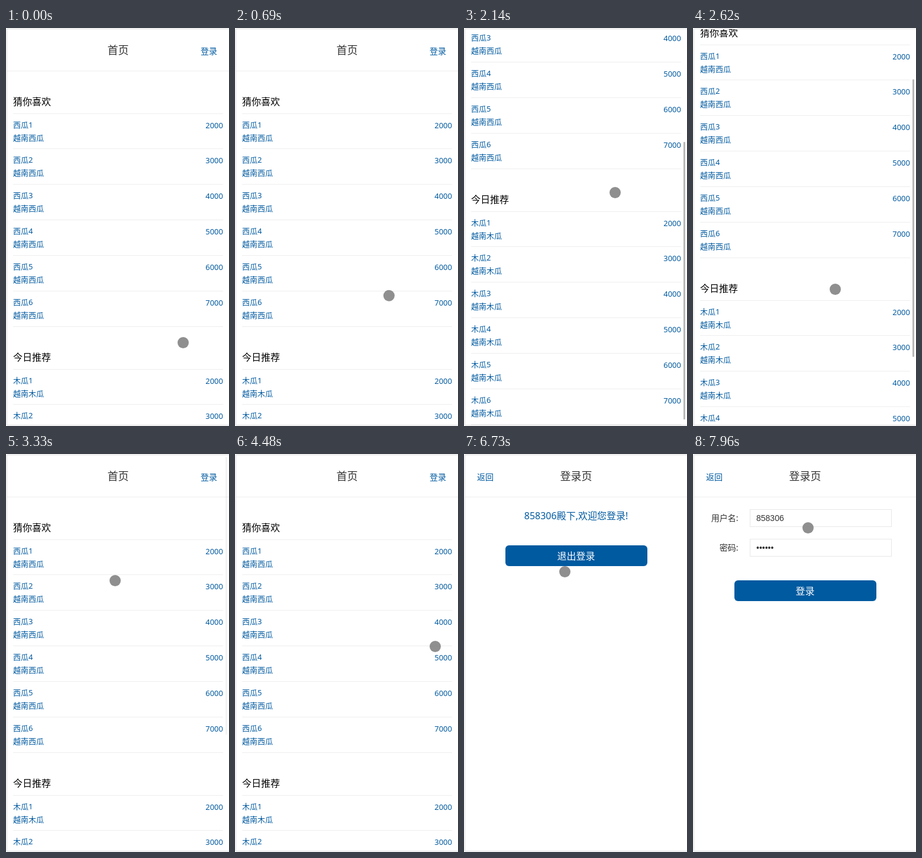
Recreate the animation shown at these times as an HTML page. Size 377 px wide and 671 px high, loop 8 s.

```html
<!DOCTYPE html>
<html lang="zh-CN">
<head>
<meta charset="utf-8">
<title>首页</title>
<style>
html, body { margin: 0; height: 100%; overflow: hidden; background: #fff; }
svg { display: block; width: 377px; height: 671px; }
text { font-family: "Noto Sans", "Noto Sans CJK SC", "Noto Sans CJK", sans-serif; white-space: pre; }
.arial { font-family: "Liberation Sans", Arial, sans-serif; }
</style>
</head>
<body>
<svg viewBox="0 0 377 671">
  <clipPath id="view"><rect x="2" y="2" width="375" height="667"/></clipPath>
  <path d="M378 1.5H1.5V669.5H378" fill="none" stroke="#ddd"/>
  <g clip-path="url(#view)">
    <g id="home"></g>
    <rect id="bar" x="371" width="3" height="468" rx="1" fill="#b8b8b8"/>
    <g id="login">
      <g id="welcome"></g>
      <g id="form"></g>
    </g>
    <g id="status"><path d="M1.5 669.5V647.5H121.5Q125.5 647.5 125.5 651.5V669.5Z" fill="#fff" stroke="#ddd"/></g>
  </g>
  <g id="cursor">
    <circle id="ring" r="11.5" fill="#ffff8c"/>
    <circle id="dot" r="9.5"/>
  </g>
</svg>
<script>
const $ = id => document.getElementById(id);
const [home, bar, login, welcome, form, statusBox, cursor, ring, dot] =
  ['home', 'bar', 'login', 'welcome', 'form', 'status', 'cursor', 'ring', 'dot'].map($);
const BLUE = '#005aa0', DARK = '#333', USER = '858306';

function add(parent, tag, attrs, content = '') {
  const el = document.createElementNS('http://www.w3.org/2000/svg', tag);
  for (const k in attrs) el.setAttribute(k, attrs[k]);
  el.textContent = content;
  parent.append(el);
}
const text = (parent, content, x, y, size, fill, anchor = 'start', cls = '') =>
  add(parent, 'text', { x, y, fill, 'font-size': size, 'text-anchor': anchor, class: cls }, content);
const line = (parent, x, y, width) =>
  add(parent, 'rect', { x, y, width, height: 1, fill: '#eee' });

function header(page, title) {
  text(page, title, 189.5, 44, 18, DARK, 'middle');
  line(page, 2, 72, 375);
}
function section(y, title, fruit) {
  text(home, title, 12, y + 130, 16, '#000');
  line(home, 12, y + 144, 355);
  for (let i = 0; i < 6; i++) {
    const top = y + 60 * i - (i > 0);
    text(home, fruit + (i + 1), 12, top + 168, 13, BLUE);
    text(home, (i + 2) * 1000, 367, top + 169, 13, BLUE, 'end');
    text(home, '越南' + fruit, 12, top + 190, 13, BLUE);
    line(home, 12, y + 60 * i + 203, 355);
  }
}
function button(page, y, label) {
  add(page, 'rect', { x: 70, y, width: 240, height: 35, rx: 6, fill: BLUE });
  text(page, label, 189.5, y + 24, 16, '#fff', 'middle');
}
function field(y, label, value) {
  text(form, label, 76.5, y + 20, 14, DARK, 'end');
  add(form, 'rect', { x: 96.5, y: y + .5, width: 239, height: 29, fill: '#fff', stroke: '#e8e8e8' });
  text(form, value, 107, y + 20, 14, DARK, 'start', 'arial');
}

header(home, '首页');
text(home, '登录', 329, 44, 14, BLUE);
section(0, '猜你喜欢', '西瓜');
section(431, '今日推荐', '木瓜');

header(login, '登录页');
text(login, '返回', 22, 44, 14, BLUE);
text(welcome, USER + '殿下,欢迎您登录!', 189.5, 110, 16, BLUE, 'middle');
button(welcome, 154, '退出登录');
field(93, '用户名:', USER);
field(143, '密码:', '••••••');
button(form, 213, '登录');
text(statusBox, '正在连接...', 5, 662.5, 12, '#6c6c6c');

// Cursor stops: arrival time, x, y
const stops = [
  [0, 299, 530], [360, 252, 314], [800, 262, 488], [1300, 270, 304], [2140, 255, 277],
  [2600, 240, 440], [3330, 184, 213], [3780, 185, 117], [4080, 338, 324], [5020, 92, 54],
  [5570, 62, 64], [5950, 343, 39], [6500, 343, 39], [6730, 170, 198], [7340, 165, 176],
  [7960, 194, 124]
];
const REST = 75, LONGEST = 500;

// Eased 0 to 1 between two times
function ramp(t, from, to) {
  const u = Math.min(1, Math.max(0, (t - from) / (to - from)));
  return u * u * (3 - 2 * u);
}
function cursorAt(t) {
  const n = stops.findIndex(s => s[0] > t);
  if (n < 0) return stops.at(-1).slice(1);
  const [left, x, y] = stops[n - 1], [arrive, toX, toY] = stops[n];
  const k = ramp(t, Math.max(left + REST, arrive - LONGEST), arrive);
  return [x + (toX - x) * k, y + (toY - y) * k];
}
const within = (t, from, to) => t >= from && t < to;
const show = (el, on) => el.setAttribute('visibility', on ? 'visible' : 'hidden');
const move = (el, x, y) => el.setAttribute('transform', `translate(${x} ${y})`);

function draw(now) {
  const t = now % 8000;
  const [x, y] = cursorAt(t);
  const scroll = Math.round(184 * ramp(t, 875, 1300) + 82 * ramp(t, 1380, 1990) - 266 * ramp(t, 2220, 2960));
  const dragging = within(t, 800, 1385) || within(t, 2220, 2600);
  const tapping = within(t, 5950, 6090) || within(t, 7340, 7480);
  const inLogin = t >= 6090, loggedOut = t >= 7480;

  move(home, 0, -scroll);
  show(home, !inLogin);
  show(login, inLogin);
  show(welcome, inLogin && !loggedOut);
  show(form, loggedOut);
  bar.setAttribute('y', 5 + scroll * .703);
  bar.setAttribute('opacity', ramp(t, 800, 860) - ramp(t, 2920, 3480));
  statusBox.setAttribute('opacity', ramp(t, 5200, 5350) - ramp(t, 6100, 6350));
  move(cursor, x + .5, y + .5);
  show(ring, dragging || tapping);
  dot.setAttribute('fill', dragging || tapping ? '#c4c144' : 'rgba(128,128,128,.88)');
  requestAnimationFrame(draw);
}
draw(0);
</script>
</body>
</html>
```
